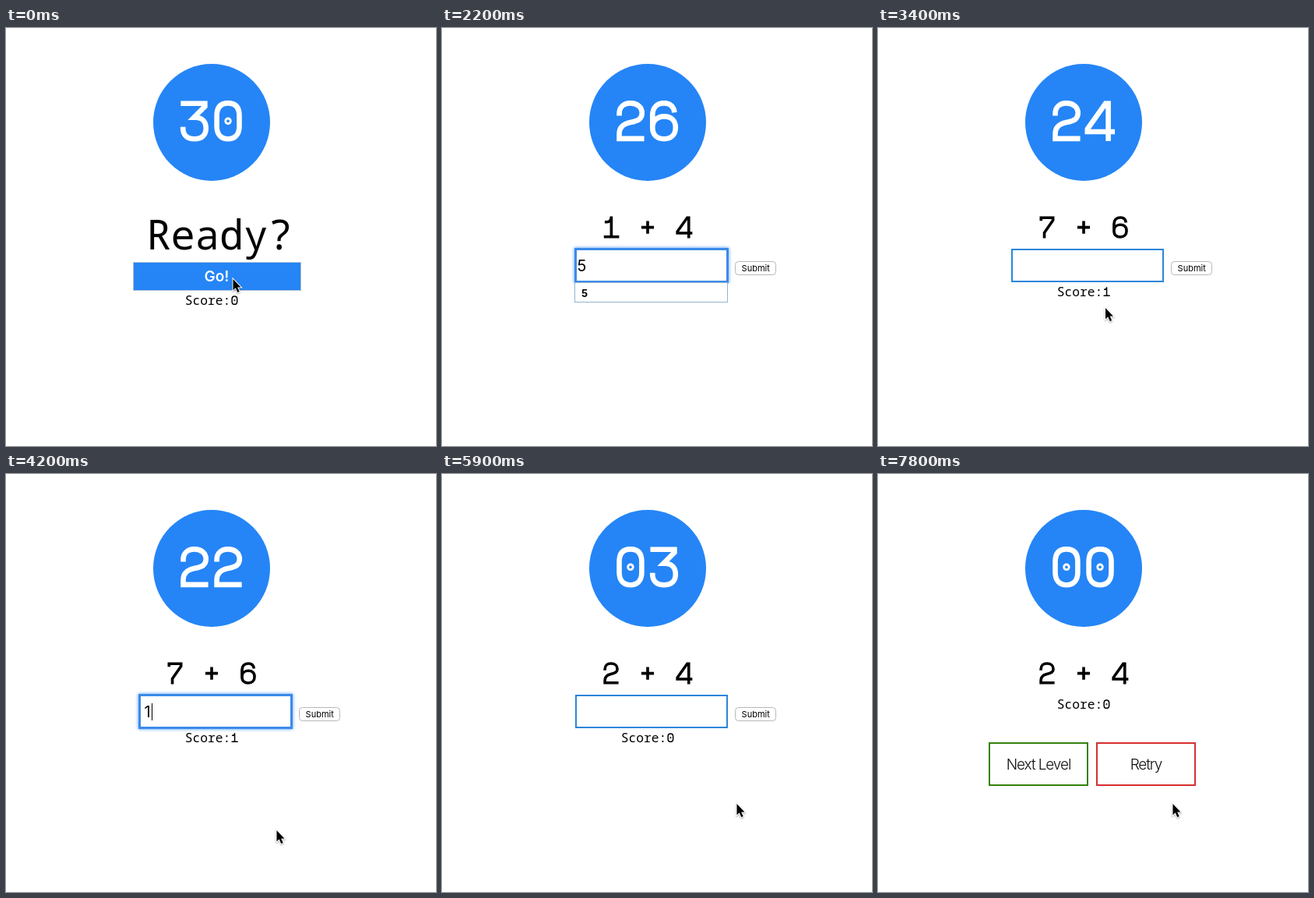
An HTML page with a canvas for the animation above (8000 ms loop, 552 px wide and 536 px high).

```html
<!DOCTYPE html>
<html lang="en">
<head>
<meta charset="utf-8">
<title>Sum quiz</title>
<style>
html, body { margin: 0; width: 100%; height: 100%; overflow: hidden; background: #fff; }
canvas { display: block; width: 552px; height: 536px; }
</style>
</head>
<body>
<canvas id="stage"></canvas>
<script>
const W = 552, H = 536, LOOP = 8000;
const BLUE = '#2585f6', EDGE = '#2d86d9';
const SANS = 'Inter, Roboto, sans-serif';
const MONO = '"Noto Sans Mono", "DejaVu Sans Mono", monospace';
const canvas = document.getElementById('stage');
const ctx = canvas.getContext('2d');
const ratio = window.devicePixelRatio || 1;
canvas.width = W * ratio;
canvas.height = H * ratio;

// Stroked figures: 100 units per em, centred on x = 0, baseline at y = 0.
const glyphs = {
  '0': 'M-20.5 -46C-20.5 -62 -13 -69 0 -69S20.5 -62 20.5 -46V-27C20.5 -12 13 -4 0 -4S-20.5 -12 -20.5 -27ZM-2 -36.5a2 2 0 1 0 4 0a2 2 0 1 0 -4 0',
  '1': 'M-21 -54H-14C-5 -54 1 -59 1 -73V-4.5M-24 -4.5H27',
  '2': 'M-20.5 -46V-50C-20.5 -62 -12 -69 0 -69S21 -62 21 -51S14 -37 0 -34S-20.5 -25 -20.5 -13V-4.5H25',
  '3': 'M-25 -68.5H19V-63L-1 -43H2C14 -43 21 -35 21 -23C21 -11 13 -4 0 -4S-21 -11 -21 -23V-26',
  '4': 'M15 0V-68.5H10L-23 -22V-17H27',
  '5': 'M20 -68.5H-17L-19 -36C-14 -43 -7 -46 1 -46C14 -46 21 -37 21 -25S13 -4 0 -4S-21 -11 -21 -22',
  '6': 'M19 -52C18 -63 11 -69 0 -69C-13 -69 -21 -61 -21 -47V-25C-21 -37 -12 -45 0 -45S21 -38 21 -25S13 -4 0 -4S-21 -11 -21 -25',
  '7': 'M-20 -58V-68.5H20V-60L-9 -18V0',
  '8': 'M0 -39C-12 -39 -18 -46 -18 -54S-12 -69 0 -69S18 -62 18 -54S12 -39 0 -39C-13 -39 -21 -32 -21 -22S-13 -4 0 -4S21 -11 21 -22S13 -39 0 -39Z',
  '9': 'M-19 -21C-18 -10 -11 -4 0 -4C13 -4 21 -12 21 -26V-48C21 -36 12 -28 0 -28S-21 -35 -21 -48S-13 -69 0 -69S21 -62 21 -48',
  '+': 'M-21 -36H21M0 -57V-15'
};
for (const c in glyphs) glyphs[c] = new Path2D(glyphs[c]);

const arrow = new Path2D('M0 0V14.2L3.2 11.3L5.7 17L8.2 15.9L5.7 10.4H10Z');

// Pointer path: time, x, y.
const route = [
  [150, 291.5, 322], [700, 545, 446], [1050, 540, 390], [1650, 300, 308],
  [2550, 432, 372], [2900, 350, 365], [3200, 292, 359], [3430, 292, 359],
  [3700, 285, 310], [3800, 285, 310], [4100, 347.5, 457], [4400, 347.5, 457],
  [4700, 390, 435], [5150, 378.5, 423]
];

// Each scene holds until the next one starts.
const scenes = [
  { at: 0, ready: true, score: 0 },
  { at: 150, sum: '1 + 4', score: 0 },
  { at: 1700, sum: '1 + 4', score: 0, focus: true },
  { at: 1950, sum: '1 + 4', score: 0, focus: true, typed: '5', list: true },
  { at: 2500, sum: '7 + 6', score: 1 },
  { at: 3700, sum: '7 + 6', score: 1, focus: true },
  { at: 4100, sum: '7 + 6', score: 1, focus: true, typed: '1' },
  { at: 4500, sum: '7 + 6', score: 1, focus: true, typed: '13' },
  { at: 4800, sum: '9 + 3', score: 2 },
  { at: 5900, sum: '2 + 4', score: 0 },
  { at: 7000, sum: '2 + 4', score: 0, over: true }
];

function text(str, x, y, font, color = '#000', align = 'left', spacing = '0px') {
  ctx.font = font;
  ctx.fillStyle = color;
  ctx.textAlign = align;
  ctx.letterSpacing = spacing;
  ctx.fillText(str, x, y);
}

function figures(str, cx, y, size, color) {
  const step = size * 0.612;
  [...str].forEach((c, i) => {
    if (!glyphs[c]) return;
    ctx.save();
    ctx.translate(cx + (i - (str.length - 1) / 2) * step, y);
    ctx.scale(size / 100, size / 100);
    ctx.lineWidth = 9.4;
    ctx.strokeStyle = color;
    ctx.stroke(glyphs[c]);
    ctx.restore();
  });
}

function frame(x, y, w, h, color, line) {
  ctx.strokeStyle = color;
  ctx.lineWidth = line;
  ctx.strokeRect(x + line / 2, y + line / 2, w - line, h - line);
}

function timeLeft(t) {
  if (t < 5900) return 30 - Math.max(0, Math.floor((t - 90) / 510));
  return Math.max(0, 3 - Math.max(0, Math.floor((t - 5470) / 510)));
}

function drawTimer(t) {
  ctx.fillStyle = BLUE;
  ctx.beginPath();
  ctx.arc(264, 121, 75, 0, Math.PI * 2);
  ctx.fill();
  figures(String(timeLeft(t)).padStart(2, '0'), 263.5, 145, 70.4, '#fff');
}

function drawScore(n, y) {
  text('Score:', 229.7, y, '16.3px ' + MONO);
  figures(String(n), 293.4, y, 16, '#000');
}

function drawStart() {
  text('Ready?', 180.4, 284, '52px ' + MONO);
  ctx.fillStyle = BLUE;
  ctx.fillRect(163, 300, 216, 37);
  frame(163, 300, 216, 37, '#b3c3d6', 1);
  text('Go!', 270.5, 325, '600 19px ' + SANS, '#fff', 'center');
}

function drawInput(s, t) {
  if (s.focus) {
    ctx.save();
    ctx.shadowColor = '#3b8ff0';
    ctx.shadowBlur = 4 * ratio;
    frame(170, 282, 198, 45, '#3b8ae8', 3);
    ctx.restore();
    ctx.fillStyle = '#fff';
    ctx.fillRect(173, 285, 192, 39);
  } else {
    frame(171, 283, 196, 43, EDGE, 2);
  }
  const typed = s.typed || '';
  const x = typed[0] === '1' ? 177.5 : 173.5;
  text(typed, x, 312, '20px ' + SANS);
  if (s.focus && (t - s.at) % 500 < 250) {
    const end = typed ? x + ctx.measureText(typed).width + 1 : 174;
    ctx.fillRect(Math.round(end), 294, 1, 22);
  }
  if (s.list) {
    ctx.fillStyle = '#fff';
    ctx.fillRect(170, 327, 197, 25);
    frame(170, 326, 197, 26, '#8fb5cf', 1);
    text(typed, 179, 345, '700 13px ' + SANS);
  }
}

function drawSubmit() {
  ctx.beginPath();
  ctx.roundRect(376.5, 299.5, 52, 17, 4);
  ctx.fillStyle = '#fff';
  ctx.fill();
  ctx.lineWidth = 1;
  ctx.strokeStyle = '#b8b8b8';
  ctx.stroke();
  text('Submit', 402.7, 312, '11px ' + SANS, '#000', 'center');
}

function drawChoice(label, x, color) {
  frame(x, 344, 128, 56, color, 2);
  text(label, x + 64, 379, '300 19px ' + SANS, '#111', 'center', '-1.1px');
}

function drawPointer(t) {
  if ((t > 660 && t < 1050) || (t > 1950 && t < 2550)) return;
  let i = route.findIndex(p => p[0] > t);
  if (i < 0) i = route.length;
  const a = route[Math.max(0, i - 1)], b = route[Math.min(i, route.length - 1)];
  const k = b[0] > a[0] ? (t - a[0]) / (b[0] - a[0]) : 0;
  ctx.save();
  ctx.translate(a[1] + (b[1] - a[1]) * k, a[2] + (b[2] - a[2]) * k);
  ctx.shadowColor = 'rgba(0,0,0,.35)';
  ctx.shadowBlur = 2 * ratio;
  ctx.shadowOffsetY = ratio;
  ctx.lineWidth = 2;
  ctx.strokeStyle = '#fff';
  ctx.stroke(arrow);
  ctx.shadowColor = 'transparent';
  ctx.fillStyle = '#000';
  ctx.fill(arrow);
  ctx.restore();
}

function draw(t) {
  const s = scenes.filter(scene => scene.at <= t).pop();
  ctx.setTransform(ratio, 0, 0, ratio, 0, 0);
  ctx.fillStyle = '#fff';
  ctx.fillRect(0, 0, W, H);
  drawTimer(t);
  if (s.ready) {
    drawStart();
    drawScore(s.score, 355);
  } else {
    figures(s.sum, 264, 269.5, 38.4, '#000');
    if (s.over) {
      drawScore(s.score, 301);
      drawChoice('Next Level', 142, '#35800f');
      drawChoice('Retry', 280, '#d62f2f');
    } else {
      if (!s.list) drawScore(s.score, 344);
      drawInput(s, t);
      drawSubmit();
    }
  }
  drawPointer(t);
}

const begin = performance.now();
function tick() {
  draw((performance.now() - begin) % LOOP);
  requestAnimationFrame(tick);
}
tick();
</script>
</body>
</html>
```
